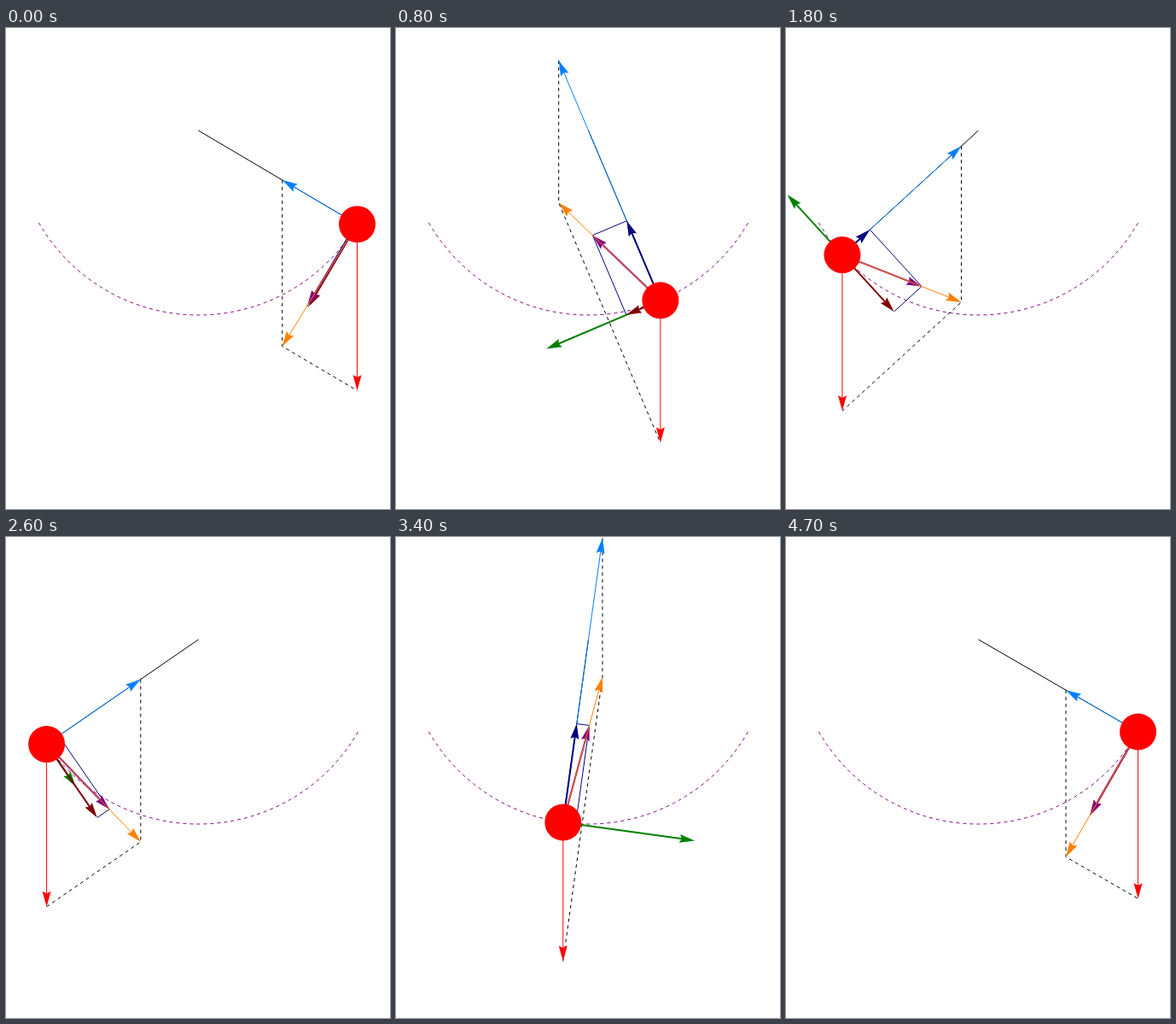
Animation of 450x563 px, one loop 4.8 s. Source, as an HTML page with a canvas:

```html
<!DOCTYPE html>
<html lang="en">
<head>
<meta charset="utf-8">
<title>Pendulum forces</title>
<style>
  html, body { margin: 0; width: 100%; height: 100%; overflow: hidden; background: #fff; }
  canvas { display: block; }
</style>
</head>
<body>
<canvas id="stage" width="450" height="563"></canvas>
<script>
const ctx = document.getElementById('stage').getContext('2d');
const PIVOT = [225.5, 120], LENGTH = 216, AMPLITUDE = Math.PI / 3;
const FRAME_MS = 100, FRAMES = 48;
const BOB_RADIUS = 21.5, ACCEL_SCALE = 2 / 3, SPEED_SCALE = 139;

const add = (p, q) => [p[0] + q[0], p[1] + q[1]];
const scale = (p, k) => [p[0] * k, p[1] * k];
const height = angle => PIVOT[1] + LENGTH * Math.cos(angle);
// Weight grows slightly towards the top of the swing.
const weightAt = angle => 162 * (1211 / (height(angle) + 875)) ** 2;

// Angles of a quarter swing, from the turning point to the bottom.
const swing = [];
for (let angle = AMPLITUDE, speed = 0; angle > 0; angle += speed) {
  swing.push(angle);
  speed -= weightAt(angle) * Math.sin(angle) * 1e-8;
}

function angleAt(phase) {
  const half = phase % (FRAMES / 2), quarter = FRAMES / 4;
  const sign = (phase < FRAMES / 2 ? 1 : -1) * (half <= quarter ? 1 : -1);
  const part = (half <= quarter ? half : 2 * quarter - half) / quarter;
  return sign * swing[Math.round(part * (swing.length - 1))];
}

function line(points, color, width = 1, dash = []) {
  ctx.strokeStyle = color;
  ctx.lineWidth = width;
  ctx.setLineDash(dash);
  ctx.beginPath();
  points.forEach(p => ctx.lineTo(...p));
  ctx.stroke();
}

function arrow(from, vector, color, width = 1) {
  const size = Math.hypot(...vector);
  if (size < BOB_RADIUS) return; // hidden behind the bob
  const tip = add(from, vector), dir = scale(vector, 1 / size);
  const at = (back, side) => add(tip, [-dir[0] * back - dir[1] * side, -dir[1] * back + dir[0] * side]);
  line([from, at(15, 0)], color, width);
  ctx.fillStyle = color;
  ctx.beginPath();
  [tip, at(18, 5), at(15.5, 0), at(18, -5)].forEach(p => ctx.lineTo(...p));
  ctx.fill();
}

function draw(frame) {
  const phase = (frame + 1) % FRAMES;
  const angle = angleAt(phase);
  const sin = Math.sin(angle), cos = Math.cos(angle);
  const out = [sin, cos], along = [cos, -sin];
  const bob = add(PIVOT, scale(out, LENGTH));

  const g = weightAt(angle);
  const centripetal = 2 * Math.sqrt(g * weightAt(AMPLITUDE)) * Math.max(0, cos - Math.cos(AMPLITUDE));
  const weight = [0, g];
  const tension = scale(out, -g * cos - centripetal);
  const net = add(weight, tension);
  const radial = scale(out, -centripetal * ACCEL_SCALE);
  const tangential = scale(along, -g * sin * ACCEL_SCALE);
  const accel = add(radial, tangential);
  const heading = phase < FRAMES / 2 ? -1 : 1;
  const velocity = scale(along, heading * Math.sqrt(SPEED_SCALE * centripetal));
  const tipOf = vector => add(bob, vector);

  ctx.clearRect(0, 0, 450, 563);
  ctx.setLineDash([4, 4]);
  ctx.lineWidth = 1;
  ctx.strokeStyle = '#800080';
  ctx.beginPath();
  ctx.arc(...PIVOT, LENGTH, Math.PI / 2 + AMPLITUDE, Math.PI / 2 - AMPLITUDE, true);
  ctx.stroke();

  line([PIVOT, bob], '#000');
  line([tipOf(tension), tipOf(net), tipOf(weight)], '#000', 1, [4, 4]);
  line([tipOf(radial), tipOf(accel), tipOf(tangential)], '#000080');
  arrow(bob, weight, '#f00');
  arrow(bob, tension, '#0080ff');
  arrow(bob, velocity, '#008000', 2);
  arrow(bob, radial, '#000080', 2);
  arrow(bob, tangential, '#800000', 2);
  arrow(bob, accel, '#800080', 2);
  arrow(bob, net, '#ff8000');

  ctx.fillStyle = '#f00';
  ctx.beginPath();
  ctx.arc(...bob, BOB_RADIUS, 0, 2 * Math.PI);
  ctx.fill();
}

const start = performance.now();
function tick() {
  draw(Math.floor((performance.now() - start) / FRAME_MS) % FRAMES);
  requestAnimationFrame(tick);
}
tick();
</script>
</body>
</html>
```
